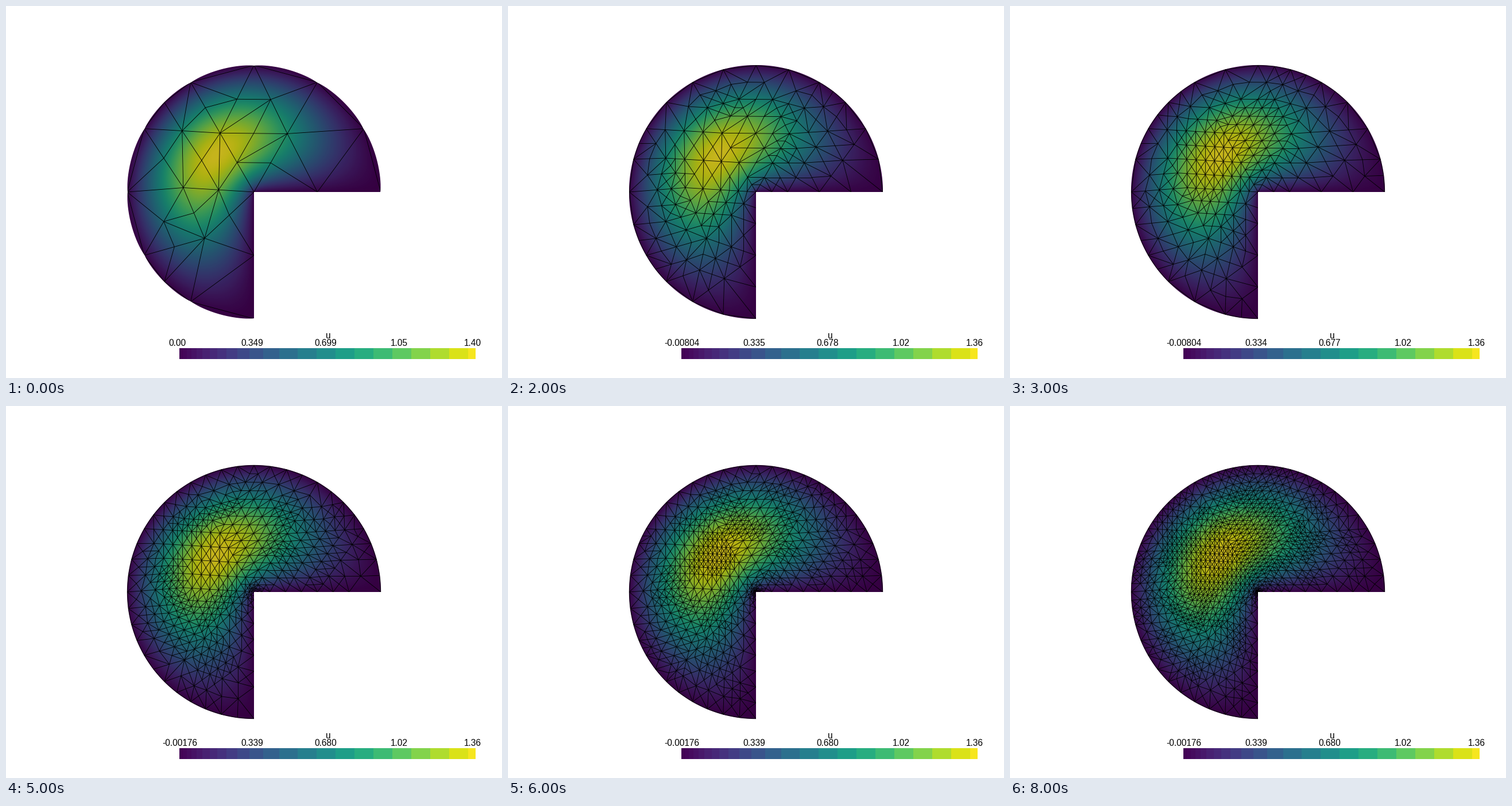
Animation, 864 px wide and 648 px high, one loop 9000 ms. Source, as a matplotlib script:

```python
import math

import matplotlib.pyplot as plt
import numpy as np
from matplotlib.animation import FuncAnimation
from matplotlib.collections import LineCollection
from matplotlib.path import Path
from matplotlib.tri import Triangulation

W, H = 864, 648
CX, CY, R = W / 2, H / 2, 221.2
NU, K = 2 / 3, 3.3754
SHADE = 0.78
STEPS = 9
LEFT, RIGHT, BOTTOM, TOP = 302, 818, 615, 596

# Colour range from the given step on
RANGES = {0: (0, 1.3975), 1: (-0.00804, 1.364), 3: (-0.00804, 1.3615),
          4: (-0.0079, 1.3625), 5: (-0.00176, 1.3615)}

viridis = plt.get_cmap("viridis")


def mode(x, y):
    """First Dirichlet eigenfunction of the three-quarter disc."""
    r = np.hypot(x, y)
    th = (np.arctan2(y, x) + math.pi / 4) % (2 * math.pi) - math.pi / 4
    z = K * r / 2
    bessel = sum((-1) ** m * z ** (2 * m + NU)
                 / (math.factorial(m) * math.gamma(m + NU + 1))
                 for m in range(16))
    return bessel * np.sin(NU * th)


PEAK = mode(-0.415 * math.sqrt(0.5), 0.415 * math.sqrt(0.5))


def worst_first(pts, tris):
    """Triangle indices by falling error estimate for quadratic elements."""
    p = np.array(pts)[np.array(tris)]
    e, f = p[:, 1] - p[:, 0], p[:, 2] - p[:, 0]
    area = abs(e[:, 0] * f[:, 1] - e[:, 1] * f[:, 0]) / 2
    x, y = p.mean(axis=1).T
    corner = 0.002 * np.hypot(x, y) ** (NU - 3)
    error = area ** 1.5 * (mode(x, y) / PEAK + 0.05 + corner)
    return np.argsort(-error, kind="stable")


def key(a, b):
    return (a, b) if a < b else (b, a)


def refine(pts, tris, marked):
    """Longest-edge bisection; marked triangles have all edges cut."""
    pts = list(pts)

    def longest_first(t):
        a, b, c = t
        turns = [(a, b, c), (b, c, a), (c, a, b)]
        return max(turns, key=lambda s: round(math.dist(pts[s[0]], pts[s[1]]), 9))

    tris = [longest_first(t) for t in tris]
    sides = [(key(a, b), key(b, c), key(c, a)) for a, b, c in tris]
    cut = {s for i in marked for s in sides[i]}
    grown = True
    while grown:
        grown = False
        for base, s1, s2 in sides:
            if base not in cut and (s1 in cut or s2 in cut):
                cut.add(base)
                grown = True

    mids = {}
    for a, b in sorted(cut):
        (xa, ya), (xb, yb) = pts[a], pts[b]
        x, y = (xa + xb) / 2, (ya + yb) / 2
        if min(math.hypot(xa, ya), math.hypot(xb, yb)) > 1 - 1e-9:
            r = math.hypot(x, y)
            x, y = x / r, y / r
        mids[a, b] = len(pts)
        pts.append((x, y))

    out = []
    for a, b, c in tris:
        m = mids.get(key(a, b))
        if m is None:
            out.append((a, b, c))
            continue
        for p, q in ((c, a), (b, c)):
            n = mids.get(key(p, q))
            out += [(p, q, m)] if n is None else [(p, n, m), (n, q, m)]
    return pts, out


def grow(pts, tris, size):
    """Refine the worst triangles until about `size` are reached."""
    order = worst_first(pts, tris)
    lo, hi = 1, len(tris)
    while hi - lo > 1:
        mid = (lo + hi) // 2
        if len(refine(pts, tris, order[:mid])[1]) < size:
            lo = mid
        else:
            hi = mid
    return refine(pts, tris, order[:hi])


def first_mesh():
    """Delaunay mesh of the domain with its seven worst triangles refined."""
    rim = [math.radians(30 * k) for k in range(10)]
    pts = [(0.0, 0.0), (0.5, 0.0), (0.0, -0.5)]
    pts += [(math.cos(t), math.sin(t)) for t in rim]
    pts += [(0.263, 0.46), (-0.268, 0.465), (-0.558, 0.034), (-0.39, -0.365)]
    p = np.array(pts)
    tris = []
    for t in Triangulation(p[:, 0], p[:, 1]).triangles.tolist():
        x, y = p[t].mean(axis=0)
        if x < 0 or y > 0:
            tris.append(tuple(t))
    return refine(pts, tris, worst_first(pts, tris)[:7])


def segments(mesh):
    pts, tris = mesh
    edges = {key(t[i], t[i - 1]) for t in tris for i in range(3)}
    p = np.array(pts) * (R - 0.4) * [1, -1] + [CX, CY]
    return p[np.array(sorted(edges))]


def outline(step):
    """Rim with small dents at the coarse rim points in the first steps."""
    deg = np.linspace(0, 270, 541)
    off = abs((deg + 15) % 30 - 15)
    r = R - 1.2 * 0.4 ** step * np.exp(-off / 2.5)
    t = np.radians(deg)
    rim = np.column_stack([CX + r * np.cos(t), CY - r * np.sin(t)])
    return Path(np.vstack([rim, [[CX, CY]], rim[:1]]))


def bar_colours():
    """Flat colour steps that widen from the dark end."""
    edges = [0.0]
    while edges[-1] < RIGHT - LEFT:
        edges.append(edges[-1] + min(6 * 1.15 ** (len(edges) - 1), 33))
    edges[-1] = RIGHT - LEFT
    edges = np.array(edges)
    x = np.arange(RIGHT - LEFT) + 0.5
    i = np.searchsorted(edges, x) - 1
    mid = (edges[i] + edges[i + 1]) / 2
    return viridis(mid / (RIGHT - LEFT))[None, :, :3]


meshes = [first_mesh()]
for n in range(1, STEPS):
    meshes.append(grow(*meshes[-1], 60 + 70 * n + 30 * n * n))
wires_at = [segments(m) for m in meshes]

X0, X1, Y0, Y1 = 205, 660, 97, 550
gx, gy = np.meshgrid(np.arange(X0, X1) + 0.5, np.arange(Y0, Y1) + 0.5)
field = mode((gx - CX) / R, (CY - gy) / R) / PEAK

fig = plt.figure(figsize=(W / 72, H / 72), dpi=72, facecolor="white")
ax = fig.add_axes([0, 0, 1, 1])
surface = ax.imshow(np.ones((Y1 - Y0, X1 - X0, 3)), extent=(X0, X1, Y1, Y0),
                    interpolation="nearest", zorder=1)
wires = LineCollection([], colors="black", linewidths=0.85, zorder=2)
ax.add_collection(wires)
ax.imshow(bar_colours(), extent=(LEFT, RIGHT, BOTTOM, TOP),
          interpolation="nearest", zorder=1)
ax.set_aspect("auto")
ax.set_xlim(0, W)
ax.set_ylim(H, 0)
ax.axis("off")

font = dict(family="Liberation Sans", fontsize=15.5, color="black",
            ha="center", va="baseline")
ax.text(561.5, 579, "u", **font)
ticks = [ax.text(301 + 128 * i, 591.5, "", **font) for i in range(5)]


def draw(step):
    lo, hi = RANGES[max(k for k in RANGES if k <= step)]
    level = np.clip((field * hi - lo) / (hi - lo), 0, 1)
    surface.set_data(viridis(level)[..., :3] * SHADE)
    wires.set_segments(wires_at[step])
    shape = outline(step)
    for artist in (surface, wires):
        artist.set_clip_path(shape, ax.transData)
    for i, label in enumerate(ticks):
        label.set_text(f"{lo + (hi - lo) * i / 4:#.3g}")
    ticks[0].set_x(303 if lo < 0 else 298)
    return [surface, wires, *ticks]


anim = FuncAnimation(fig, draw, frames=STEPS, interval=1000, repeat=True,
                     repeat_delay=0, init_func=lambda: draw(0), blit=False)
plt.show()
```
